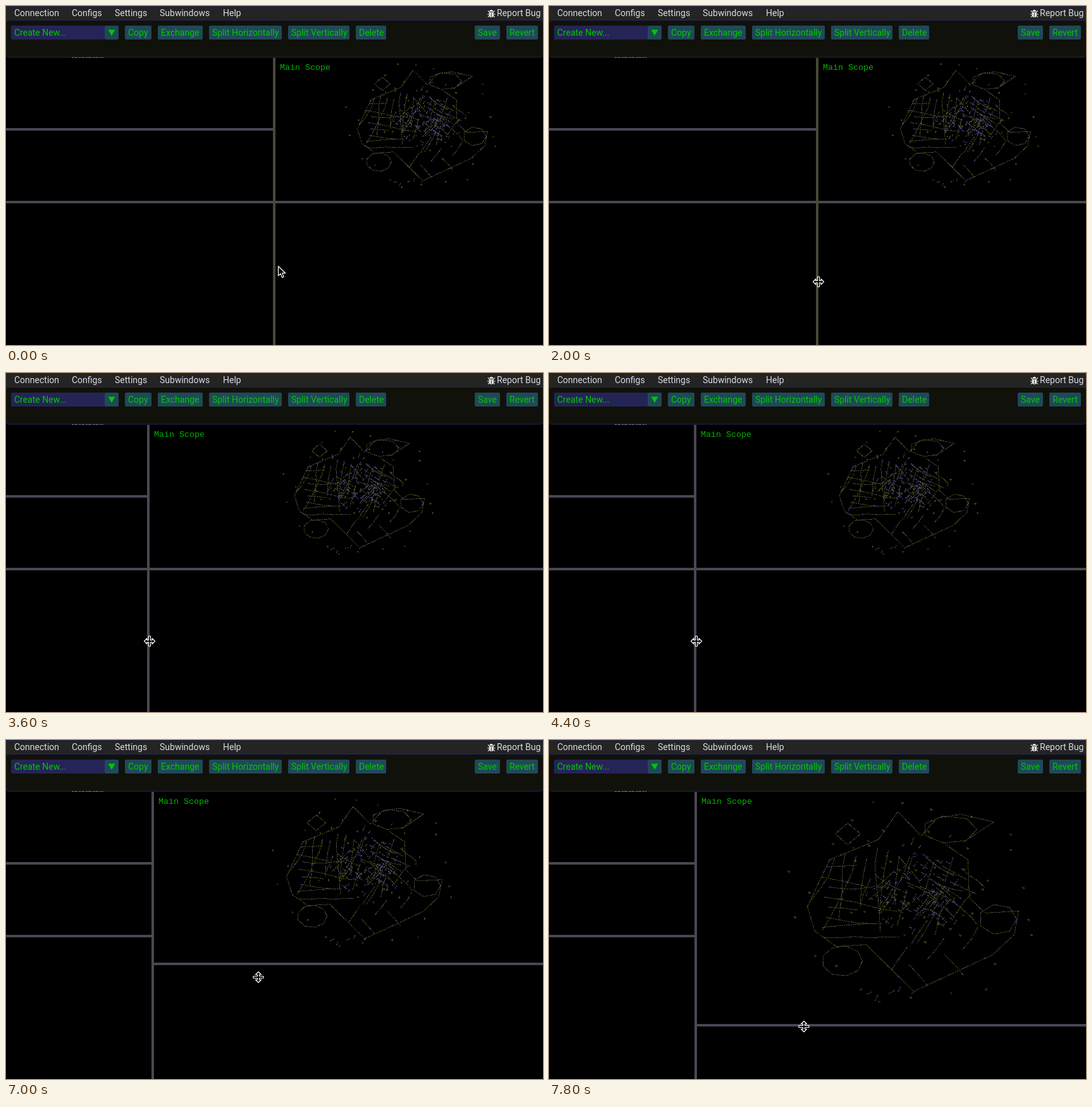
Animation, 849 px wide and 536 px high, one loop 8000 ms. Source, as an HTML page:

```html
<!DOCTYPE html>
<html lang="en">
<head>
<meta charset="utf-8">
<title>Scope panes</title>
<style>
html, body { margin: 0; width: 100%; height: 100%; overflow: hidden; background: #000; }
svg { display: block; width: 849px; height: 536px; }
text { font: 14px Roboto, sans-serif; white-space: pre; }
.menu { fill: #dadae8; }
.btn { fill: #00c800; }
.scope { font: 13.33px "Liberation Mono", monospace; fill: #00b400; }
.map path { fill: none; vector-effect: non-scaling-stroke; shape-rendering: crispEdges; }
.olive { stroke: #48481c; stroke-dasharray: 3 1 2 1; }
.blue { stroke: #48487c; stroke-dasharray: 3 1 2 1; }
.tint { stroke: #48487c; stroke-dasharray: 4 14 3 19; }
.bar { fill: #484854; }
.cursor { fill: #000; stroke: #fff; stroke-width: 1.2; stroke-linejoin: round; }
</style>
</head>
<body>
<svg viewBox="0 0 849 536">
  <rect width="849" height="536"/>
  <g class="map" id="map"></g>
  <rect class="bar" y="193" height="4" id="leftTop"/>
  <rect class="bar" y="308" height="4" id="leftLow"/>
  <rect class="bar" height="4" id="right"/>
  <rect class="bar" y="82" width="4" height="454" id="split"/>
  <text class="scope" y="101" id="title">Main Scope</text>
  <rect width="849" height="23" fill="#242422"/>
  <path d="M0 .5H849" stroke="#20204c"/>
  <rect x="-.5" y="22.5" width="850" height="58.5" rx="5" fill="#11110b" stroke="#24245c"/>
  <path d="M104 81.5H154" stroke="#74749c" stroke-dasharray="3 1 5 2"/>
  <g id="ui"></g>
  <g fill="#e8e8e8" stroke="#e8e8e8">
    <path d="M764.5 9a2.8 3 0 0 1 5.6 0z" stroke="none"/>
    <path d="M763.8 10h7v4.2a3.5 3.8 0 0 1-7 0z" stroke="none"/>
    <path d="M762 7.5l2.5 2.6M772.6 7.5l-2.5 2.6M761 13h12.6M762 17.6l2.5-2.6M772.6 17.6l-2.5-2.6" stroke-width="1.2"/>
    <path d="M767.3 11v6.5" stroke="#242422"/>
  </g>
  <path class="cursor" id="arrow" d="M.5 .5V15.5L4 12.2L6.6 18.2L9.2 17.1L6.6 11.3H11.6z"/>
  <path class="cursor" id="resize" d="M-8.5 0L-4-4.5V-1.5H-1.5V-8H1.5V-1.5H4V-4.5L8.5 0L4 4.5V1.5H1.5V8H-1.5V1.5H-4V4.5z"/>
</svg>
<script>
const $ = id => document.getElementById(id);
const set = (el, attrs) => { for (const k in attrs) el.setAttribute(k, attrs[k]); };
const make = (parent, tag, attrs, text) => {
  const el = document.createElementNS(parent.namespaceURI, tag);
  set(el, attrs);
  if (text) el.textContent = text;
  return parent.appendChild(el);
};

// Menu bar and toolbar
const ui = $('ui');
const menu = (x, label) => make(ui, 'text', { class: 'menu', x, y: 16 }, label);
const box = (x, width, fill) => make(ui, 'rect', { x, y: 31, width, height: 22, rx: 2, fill });
const button = (x, width, label) => {
  box(x, width, '#1f4958');
  make(ui, 'text', { class: 'btn', x: x + 5, y: 47 }, label);
};
menu(13, 'Connection');
menu(104, 'Configs');
menu(172, 'Settings');
menu(243, 'Subwindows');
menu(343, 'Help');
menu(776, 'Report Bug');
box(8, 149, '#242456');
make(ui, 'text', { class: 'btn', x: 13, y: 47 }, 'Create New...');
box(156, 22, '#1f4958');
make(ui, 'path', { d: 'M161.5 37.5h11l-5.5 9.5z', fill: '#00c800' });
button(188, 42, 'Copy');
button(240, 71, 'Exchange');
button(321, 115, 'Split Horizontally');
button(446, 97, 'Split Vertically');
button(553, 48, 'Delete');
button(741, 40, 'Save');
button(791, 50, 'Revert');

// Video map, centred on 0,0 in a pane 367 high
let seed = 41;
const rnd = () => (seed = seed * 16807 % 2147483647) / 2147483647;
const bell = () => (rnd() + rnd() + rnd()) / 1.5 - 1;
const { PI, cos, sin } = Math;
const loop = (cx, cy, rx, ry, sides) => {
  const points = Array.from({ length: sides }, (_, i) => {
    const a = 2 * PI * i / sides;
    return `${cx + rx * cos(a)} ${cy + ry * sin(a)}`;
  });
  return `M${points.join('L')}z`;
};
// A run of straight pieces that slowly bends
const road = (x, y, angle, step, count) => {
  let d = `M${x} ${y}`;
  for (let i = 0; i < count; i++) {
    angle += bell() * .3;
    d += `l${step * cos(angle)} ${step * sin(angle)}`;
  }
  return d;
};

let olive = 'M-98-76L-133-2L-121 37L-87 61L-40 58L35 132L160 74L194 42L201 5L148 8L123-16L121-76L86-100' +
  'M-98-76L-21-108L10-152L47-114L72-142L109-148L162-136L114-104' +
  loop(-78, 84, 32, 24, 9) + loop(-69, -117, 20, 17, 4) + loop(168, 18, 30, 24, 7) + loop(92, -124, 43, 22, 7);
let blue = '', dots = '';

for (let i = 0; i < 8; i++) {
  olive += road(-90 + i * 17, -78 - rnd() * 24, 1.75, 26, 3 + i % 3);
  olive += road(-118 + rnd() * 20, -65 + i * 16, .1, 24, 2 + i % 4);
}
for (let i = 0; i < 32; i++) {
  const angle = i % 2 ? 2.1 : .6;
  olive += road(50 + bell() * 95, -25 + bell() * 105, angle + bell() * .4, 12 + rnd() * 8, 3);
}
for (let i = 0; i < 5; i++) olive += road(0 + i * 28, 98 - i * 8, i % 2 ? .85 : -.9, 22, 2);
for (let i = 0; i < 85; i++) {
  const piece = road(45 + bell() * 105, -20 + bell() * 105, rnd() < .6 ? -1 : .6, 4 + rnd() * 10, 1);
  if (i % 2) blue += piece; else olive += piece;
}
const dot = (x, y) => { dots += loop(x, y, 1.5, 1.5, 4); };
for (let i = 0; i < 22; i++) {
  const a = 2 * PI * (i + rnd() * .6) / 22, r = 1 + rnd() * .25;
  dot(35 + 165 * r * cos(a), -8 + 142 * r * sin(a));
}
for (let i = 0; i < 45; i++) dot(35 + bell() * 150, -30 + bell() * 125);
for (let i = 0; i < 5; i++) blue += road(-40 + i * 18, 124 + rnd() * 14, i % 2 ? 2 : -.6, 10, 1);

const map = $('map');
make(map, 'path', { class: 'olive', d: olive });
make(map, 'path', { class: 'tint', d: olive });
make(map, 'path', { class: 'blue', d: blue });
make(map, 'path', { class: 'olive', d: dots });

// Progress from a to b, slowing down when power > 1
const ramp = (t, a, b, power = 1) => {
  const k = Math.min(1, Math.max(0, (t - a) / (b - a)));
  return 1 - (1 - k) ** power;
};

function draw(time) {
  const t = Math.floor(time % 8000 / 200) * 200;

  // The dividers trail behind the pointer
  const back = 7 * ramp(t, 3600, 4600);
  const leave = ramp(t, 4600, 5200), approach = ramp(t, 5800, 6600);
  const vx = Math.round(424 - 199 * ramp(t, 2400, 3600, 1.45) + back);
  const hy = Math.round(310 + 141 * ramp(t, 6800, 7800, 1.68));
  const x = Math.round(430 - 4 * ramp(t, 200, 1200) - 199 * ramp(t, 2400, 3600, 2) + back
    + 153 * leave + 10 * approach + 6 * ramp(t, 6800, 7800, 2));
  const y = Math.round(411 + 25 * ramp(t, 200, 1200) - 12 * ramp(t, 2800, 3600) - 109 * leave
    + 11 * sin(PI * ramp(t, 5600, 6600)) - 4 * approach + 142 * ramp(t, 6800, 7800, 2.7));

  const height = hy - 84;
  set(map, { transform: `translate(${(vx + 851) / 2} ${82 + height / 2}) scale(${height / 367})` });
  set($('leftTop'), { width: vx - 2 });
  set($('leftLow'), { width: vx - 2 });
  set($('right'), { x: vx + 2, y: hy - 2, width: 847 - vx });
  set($('split'), { x: vx - 2 });
  $('split').style.fill = t < 2600 ? '#484836' : '';
  set($('title'), { x: vx + 9 });

  const across = t >= 1200 && t < 4800, down = t >= 6600;
  set($('arrow'), { transform: `translate(${x} ${y})`, visibility: across || down ? 'hidden' : 'visible' });
  set($('resize'), {
    transform: `translate(${x} ${y}) rotate(${down ? 90 : 0})`,
    visibility: across || down ? 'visible' : 'hidden'
  });
}

let start;
function tick(now) {
  start ??= now;
  draw(now - start);
  requestAnimationFrame(tick);
}
draw(0);
requestAnimationFrame(tick);
</script>
</body>
</html>
```
